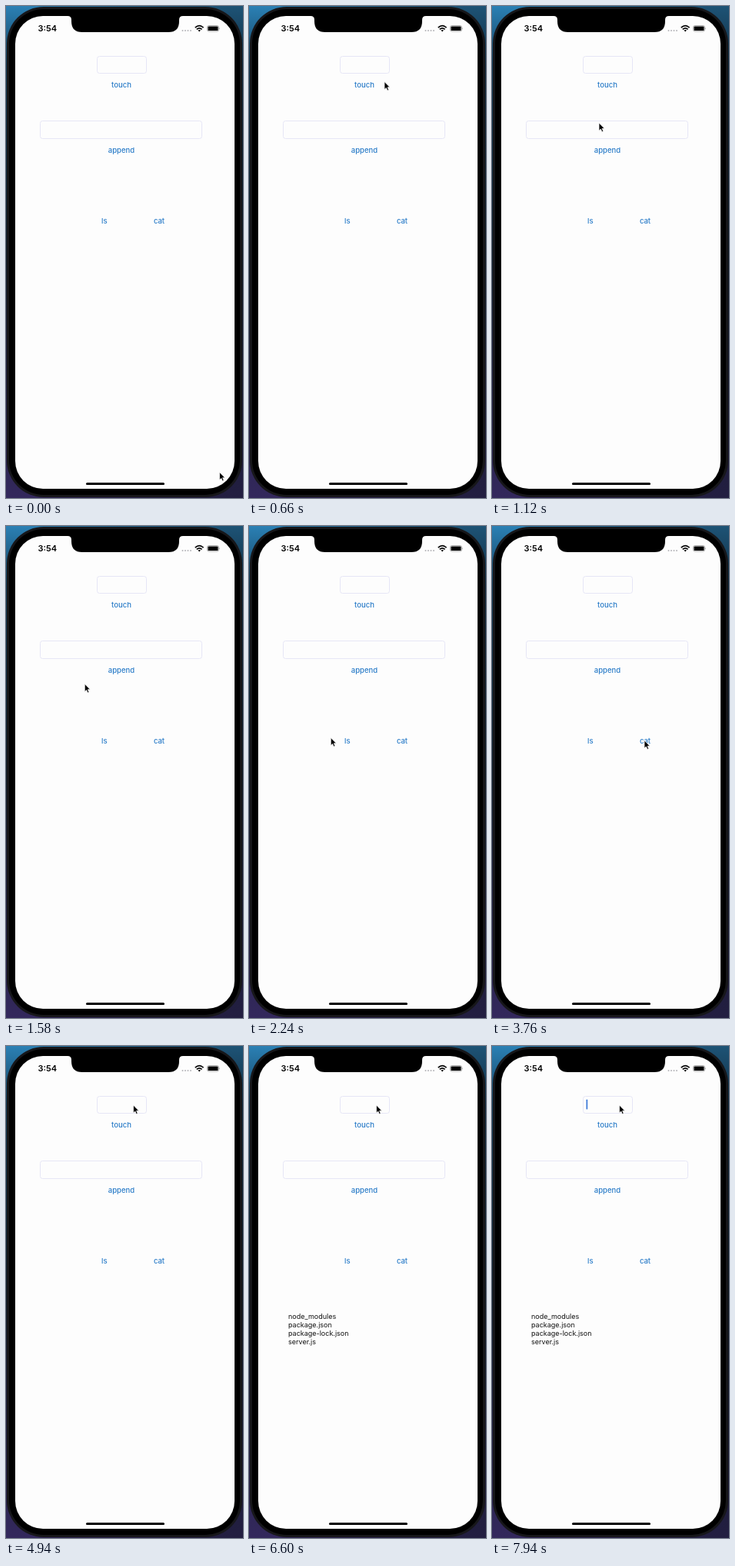
Animation, 308 px wide and 640 px high, one loop 8 s. Source, as an HTML page:

```html
<!DOCTYPE html>
<html lang="en">
<head>
<meta charset="utf-8">
<title>File commands</title>
<style>
  html, body { margin: 0; width: 100%; height: 100%; overflow: hidden; background: #12121c; }
  svg { display: block; width: 100vw; height: 100vh; }
  text { font-family: Inter, Roboto, sans-serif; }
  .button { font-size: 9.5px; font-weight: 500; fill: #2a7cc8; text-anchor: middle; }
  .list { font-size: 9px; fill: #111; }
  .field { fill: none; stroke: #e6e6f6; }
</style>
</head>
<body>
<svg viewBox="0 0 308 640">
  <defs>
    <linearGradient id="desk" x2="0" y2="1">
      <stop offset="0" stop-color="#2b80b4"/>
      <stop offset=".12" stop-color="#14405e"/>
      <stop offset=".5" stop-color="#10202e"/>
      <stop offset="1" stop-color="#33285c"/>
    </linearGradient>
    <linearGradient id="shade">
      <stop offset=".1" stop-color="#0a1018" stop-opacity="0"/>
      <stop offset=".9" stop-color="#0a1018" stop-opacity=".4"/>
    </linearGradient>
  </defs>

  <rect width="308" height="640" fill="url(#desk)"/>
  <rect width="308" height="640" fill="url(#shade)"/>
  <rect x="1" y="1" width="306" height="638" rx="48" fill="#17171a"/>
  <rect x="4" y="4" width="300" height="632" rx="45" fill="#000"/>
  <rect x="12" y="13" width="285" height="615" rx="36" fill="#fdfdfd"/>
  <path d="M80 12.5V13Q85 13 85 18V20Q85 34 99 34H211Q225 34 225 20V18Q225 13 230 13V12.5Z"/>

  <text x="41.5" y="33" font-size="11" font-weight="600">3:54</text>
  <g fill="#b5b5b8">
    <circle cx="229.5" cy="32" r="1"/><circle cx="233" cy="32" r="1"/>
    <circle cx="236.5" cy="32" r="1"/><circle cx="240" cy="32" r="1"/>
  </g>
  <g fill="none" stroke="#000" stroke-width="1.7">
    <path d="M245.8 28.2Q251.2 23.2 256.6 28.2"/>
    <path d="M247.8 30.4Q251.2 27.3 254.6 30.4"/>
  </g>
  <path d="M249.4 31.6Q251.2 30.2 253 31.6L251.2 33.5Z"/>
  <rect x="261.5" y="25.5" width="15" height="7.5" rx="2.2" fill="none" stroke="#999" stroke-width=".8"/>
  <rect x="262.5" y="26.4" width="13" height="5.7" rx="1.2"/>
  <path d="M277.4 28V30.6Q278.6 29.3 277.4 28Z" fill="#888"/>

  <rect class="field" x="118.5" y="65.5" width="64" height="22" rx="3"/>
  <rect class="field" x="44.5" y="149.5" width="210" height="23" rx="3"/>
  <text class="button" x="150" y="106.3">touch</text>
  <text class="button" x="150" y="191.3">append</text>
  <text class="button" x="127.8" y="283.3">ls</text>
  <text class="button" x="199" y="283.3">cat</text>

  <g class="list" id="files" visibility="hidden">
    <text x="51" y="354.5">node_modules</text>
    <text x="51" y="365.5">package.json</text>
    <text x="51" y="376.5">package-lock.json</text>
    <text x="51" y="387.5">server.js</text>
  </g>
  <rect id="caret" x="122.5" y="69.5" width="1.7" height="13" rx=".8" fill="#3a78d8" opacity="0"/>
  <rect x="104" y="620" width="102" height="3" rx="1.5"/>
  <path id="pointer" d="M0 0V10L2.3 7.9L3.9 11.5L5.6 10.8L4.1 7.2H7.1Z" stroke="#fff" stroke-width=".7" stroke-linejoin="round"/>
</svg>

<script>
const LOOP = 8000;
const FOCUS = 5420;

// time, x, y of the pointer tip
const path = [
  [0, 277.5, 606.5], [660, 176, 98.5], [1580, 102.3, 205.5], [2240, 106.3, 275.5],
  [3020, 131, 279], [3760, 198, 279], [3980, 198, 279], [4780, 165.5, 77], [LOOP, 165.5, 77]
];
// time, opacity of the blinking caret
const blink = [
  [0, 0], [FOCUS - 1, 0], [FOCUS, 1], [6000, 1], [6140, 0], [6600, 0],
  [6740, 1], [7160, 1], [7340, 0], [7800, 0], [7930, 1], [LOOP, 1]
];

const [files, caret, pointer] = ['files', 'caret', 'pointer'].map(id => document.getElementById(id));
const smooth = p => p * p * (3 - 2 * p);

function valueAt(keys, t) {
  const i = keys.findIndex(k => k[0] > t);
  const a = keys[i - 1], b = keys[i];
  const p = smooth((t - a[0]) / (b[0] - a[0]));
  return a.slice(1).map((v, n) => v + (b[n + 1] - v) * p);
}

function draw(now) {
  const t = Math.max(0, now - start) % LOOP;
  pointer.setAttribute('transform', `translate(${valueAt(path, t)})`);
  caret.setAttribute('opacity', valueAt(blink, t)[0]);
  files.setAttribute('visibility', t < FOCUS ? 'hidden' : 'visible');
  requestAnimationFrame(draw);
}

const start = performance.now();
draw(start);
</script>
</body>
</html>
```
